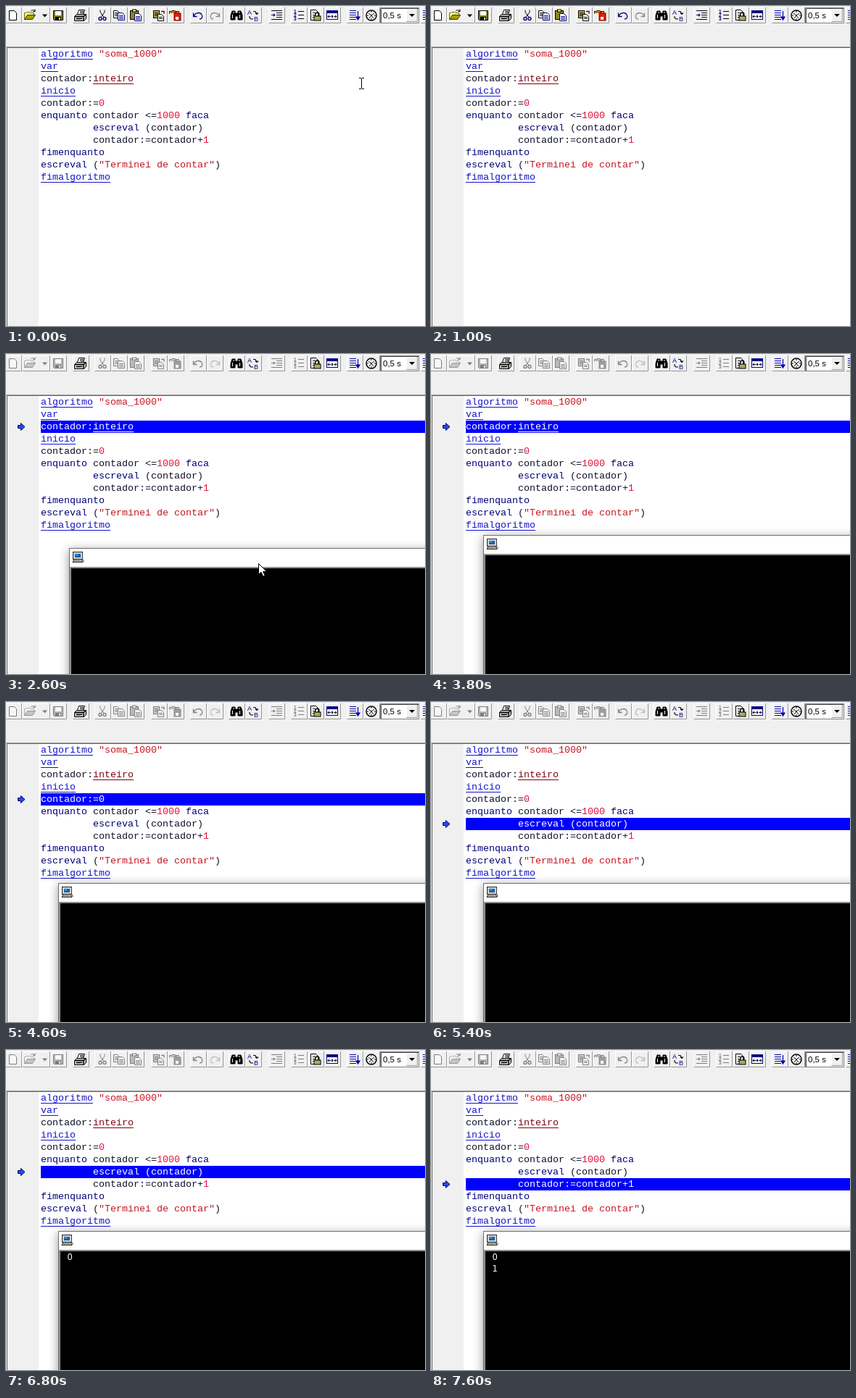
Recreate the animation shown at these times as an HTML page. Size 578 px wide and 442 px high, loop 8 s.

```html
<!DOCTYPE html>
<html lang="pt">
<head>
<meta charset="utf-8">
<title>Passo a passo</title>
<style>
html, body { margin: 0; width: 100%; height: 100%; overflow: hidden; background: #f0f0f0; }
svg { display: block; width: 578px; height: 442px; }
.code { font: 13.33px "Liberation Mono", "Courier New", monospace; white-space: pre; }
.sel text, .sel rect { fill: #fff; }
.off { filter: grayscale(1) opacity(.48); }
.ui { font: 11px "Liberation Sans", Arial, sans-serif; }
.out { font: 11.5px "DejaVu Sans", sans-serif; fill: #fff; }
</style>
</head>
<body>
<svg id="stage" viewBox="0 0 578 442" xmlns="http://www.w3.org/2000/svg"></svg>
<script>
const LOOP = 8000, TICK = 200, ROW = 17, TOP = 58;
const stage = document.getElementById('stage');

const rect = (x, y, w, h, fill, extra = '') =>
  `<rect x="${x}" y="${y}" width="${w}" height="${h}" fill="${fill}" ${extra}/>`;
const path = (d, stroke = '#000', fill = 'none', width = 1) =>
  `<path d="${d}" stroke="${stroke}" fill="${fill}" stroke-width="${width}"/>`;
const circle = (x, y, r, stroke, fill = 'none', width = 1) =>
  `<circle cx="${x}" cy="${y}" r="${r}" stroke="${stroke}" fill="${fill}" stroke-width="${width}"/>`;
const label = (x, y, s, fill, size, weight = 400) =>
  `<text class="ui" x="${x}" y="${y}" fill="${fill}" style="font-size:${size}px;font-weight:${weight}">${s}</text>`;
const page = (x, y, w, h, stroke = '#000') =>
  path(`M${x} ${y}h${w - 3}l3 3v${h - 3}h${-w}z`, stroke, '#fff');
const lines = (x, y, w, n, color = '#000', step = 3) =>
  path(Array.from({ length: n }, (_, i) => `M${x} ${y + i * step}h${w}`).join(''), color);

// Icons are drawn around their own centre.
const folder = path('M-8.5 5.5v-9h2l1-1h4l1 1h5v3', '#6b6b00', '#ffff80') +
  path('M-8.5 5.5l4-6h11l-4 6z', '#333300', '#a8a000') +
  path('M0 -5.5c2 -3 5 -2 6 0m0 -3v3h-3');
const clipboard = rect(-7.5, -6.5, 11, 12, '#8c8420', 'stroke="#000"') +
  rect(-4.5, -8, 5, 3, '#ffff70', 'stroke="#000"') +
  page(-1.5, -2.5, 9, 10, '#000080') + lines(0, 1.5, 6, 3, '#000080', 2);
const icons = {
  blank: page(-5.5, -6.5, 10, 13),
  open: folder,
  save: path('M-6.5 -6.5h13v13h-12l-1-1z', '#000', '#808000') +
    rect(-4, -6, 8, 6, '#fff') + rect(-4, 2, 8, 5, '#000') + rect(1, 3, 2, 3, '#fff'),
  print: path('M-4.5 -1.5l2-6h8l-2 6', '#000', '#fff') +
    path('M-8.5 1.5l3-3h13v6l-3 3h-13z', '#000', '#c0c0c0') +
    path('M-8 1.5h12v6M4 1.5l3-3M-6 4.5h8', '#000', 'none', 1.4) +
    rect(-1, 5, 3, 1.5, '#e0d000') + lines(-1, -5.5, 5, 2, '#000', 2),
  cut: path('M-3 -7.5v3l5 7M3 -7.5v3l-5 7', '#000') +
    circle(-3, 4.5, 2, '#000080', 'none', 1.4) + circle(3, 4.5, 2, '#000080', 'none', 1.4),
  copy: page(-7.5, -6.5, 8, 10) + lines(-6, -3.5, 4, 3, '#000', 2) +
    page(-1.5, -3.5, 9, 10, '#000080') + lines(0, .5, 6, 3, '#000080', 2),
  paste: clipboard,
  stack: rect(-7.5, -6.5, 8, 10, '#c0b030', 'stroke="#000"') + lines(-6, -3.5, 5, 3, '#000', 2) +
    page(-1.5, -1.5, 8, 9) + lines(0, 2.5, 5, 2, '#000', 2) + path('M3 -5.5h4v3', '#800000', 'none', 1.5),
  stamp: path('M-8.5 -2.5v-3h2l1-1h4l1 1h5v4', '#000', '#f0d020') +
    rect(-2, -3, 9, 10, '#e02010', 'stroke="#700"') + rect(0, 2, 4, 4, '#fff') +
    path('M-7 -4.5h8m-2 -2l3 2l-3 2', '#c00000', '#c00000'),
  undo: path('M-6.5 -3.5v5h5M-6 1c2 -5 9 -6 11 -2c2 3 0 6 -3 6', '#000080', 'none', 1.3),
  redo: path('M6.5 -3.5v5h-5M6 1c-2 -5 -9 -6 -11 -2c-2 3 0 6 3 6', '#888', 'none', 1.3),
  find: path('M-6 -6h4v3h4v-3h4l2 6v6h-6v-5h-4v5h-6v-6z', '#000', '#000') +
    path('M-5.5 -1v5M4.5 -1v5M-4 -5v2M4 -5v2', '#fff'),
  swap: label(-8, -1, 'A', '#000080', 9) + label(1, 8, 'B', '#000080', 9) +
    path('M0 -5.5h3l2 3m-2 -1l2 2l2 -2M-5 1v2l2 2h3', '#000', 'none', 1.1),
  indent: lines(-7, -6.5, 15, 2, '#000', 12) + lines(0, -3.5, 8, 3) +
    path('M-7 -.5h5m-2 -2l2 2l-2 2', '#000080', '#000080'),
  list: lines(-1, -5.5, 8, 3, '#000', 5) +
    [0, 1, 2].map(i => label(-7, -3 + 5 * i, i + 1, '#000080', 6.5, 700)).join(''),
  lock: page(-6.5, -7.5, 10, 14) + lines(-4, -3.5, 4, 3) +
    path('M0 1v-2c0 -4 5 -4 5 0v2', '#000', 'none', 1.3) + rect(-2, 1, 9, 6, '#b0a860', 'stroke="#000"'),
  panel: rect(-7.5, -6.5, 15, 12, '#fff', 'stroke="#000080"') + rect(-7, -6, 14, 3, '#000080') +
    path('M-6 1.5h4m-2 -2l-2 2l2 2M6 1.5h-4m2 -2l2 2l-2 2', '#000') + rect(-1, 0, 2, 3, '#000080'),
  run: lines(-7, -6.5, 9, 5, '#0000b0') +
    path('M4.5 -6v11m-2.5 -3l2.5 4l2.5 -4z', '#0000b0', '#0000b0', 1.2),
  clock: circle(0, 0, 7, '#000', '#fff', 1.5) +
    path('M-4 -3l4 3l4 -3M-3 4l3 -4l3 4M0 -6v2M0 4v2M-6 0h2M4 0h2', '#000')
};

// name, left, width, greyed while the program runs
const buttons = [
  ['blank', -1, 23, 1], ['open', 22, 39, 1], ['save', 61, 23, 1], ['print', 92, 23, 0],
  ['cut', 122, 23, 1], ['copy', 145, 23, 1], ['paste', 168, 23, 1],
  ['stack', 200, 23, 1], ['stamp', 223, 23, 1], ['undo', 254, 23, 1], ['redo', 277, 23, 1],
  ['find', 307, 23, 0], ['swap', 330, 23, 0], ['indent', 362, 23, 1], ['list', 393, 23, 1],
  ['lock', 416, 23, 0], ['panel', 439, 23, 0], ['run', 470, 23, 0], ['clock', 493, 23, 0]
];
const bevel = (x, y, w, h) => rect(x, y, w, h, '#f0f0f0') +
  path(`M${x + .5} ${y + h - 1}V${y + .5}H${x + w - 1}`, '#fff') +
  path(`M${x + .5} ${y + h - .5}H${x + w - .5}V${y}`, '#969696');
const button = ([name, x, w, dims]) => {
  const cx = name === 'open' ? x + 12 : x + 11;
  const drop = name === 'open' ? path(`M${x + 28} 11.5h7l-3.5 4z`, 'none', '#000') : '';
  return bevel(x, 2, w, 22) +
    `<g ${dims ? 'data-dims' : ''}><g transform="translate(${cx} 13)">${icons[name]}</g>${drop}</g>`;
};
const combo = rect(516.5, 2.5, 53, 21, '#fff', 'stroke="#808080"') +
  path('M517.5 23V3.5H569', '#505050') + label(520, 17, '0,5 s', '#000', 11.5) +
  bevel(552, 4, 16, 18) + path('M556 11h8l-4 4z', 'none', '#000') +
  bevel(572, 2, 23, 22) + lines(575, 6.5, 6, 5, '#0000b0');

// Tokens: k underlined keyword, w plain keyword, t type, n number, s string, i identifier
const colors = { k: '#1414c8', w: '#000078', t: '#800010', n: '#e0143c', s: '#c81420', i: '#101028' };
const program = [
  [['k', 'algoritmo'], ['s', ' "soma_1000"']],
  [['k', 'var']],
  [['i', 'contador:'], ['t', 'inteiro']],
  [['k', 'inicio']],
  [['i', 'contador:='], ['n', '0']],
  [['w', 'enquanto'], ['i', ' contador <='], ['n', '1000'], ['w', ' faca']],
  [['w', '         escreval'], ['i', ' (contador)']],
  [['i', '         contador:=contador+'], ['n', '1']],
  [['w', 'fimenquanto']],
  [['w', 'escreval'], ['i', ' ('], ['s', '"Terminei de contar"'], ['i', ')']],
  [['k', 'fimalgoritmo']]
];
const codeLine = (tokens, i) => {
  let x = 48;
  const y = TOP + i * ROW;
  const body = tokens.map(([kind, s]) => {
    const at = x, color = colors[kind];
    x += 8 * s.length;
    const lead = s.length - s.trimStart().length;
    return `<text class="code" x="${at + 8 * lead}" y="${y + 12}" fill="${color}">${s.trim().replace('<', '&lt;')}</text>` +
      ('kt'.includes(kind) ? rect(at, y + 15, 8 * s.length, 1, color) : '');
  }).join('');
  return `<g class="line">${body}</g>`;
};

const computer = rect(5.5, 5.5, 13, 10, '#d8d4c8', 'stroke="#202020"') +
  rect(8, 8, 8, 5, '#1060c0') + rect(9, 9, 3, 1, '#60d0ff') +
  path('M7 15.5h10l2 4h-14z', '#202020', '#c8c4b0') + path('M18.5 6v9l2 4', '#404040') +
  lines(7, 17.5, 9, 1, '#707060');

stage.innerHTML = `
  <defs><filter id="shade" x="-10%" y="-15%" width="120%" height="130%">
    <feDropShadow dx="0" dy="3" stdDeviation="7" flood-opacity=".42"/></filter></defs>
  ${rect(0, 0, 578, 442, '#f0f0f0')}
  ${buttons.map(button).join('')}${combo}
  ${rect(45, 58, 533, 384, '#fff')}
  ${rect(0, 56, 578, 1, '#a0a0a0')}${rect(1, 57, 577, 1, '#696969')}${rect(1, 57, 1, 385, '#696969')}
  <g id="mark">${rect(48, 0, 530, ROW, '#0000ff')}
    ${path('M16.5 6.5h4v-3l5.5 5l-5.5 5v-3h-4z', '#000070', '#2050f0')}</g>
  ${program.map(codeLine).join('')}
  <g id="console">
    <g filter="url(#shade)">${rect(0, 0, 640, 330, '#707070')}</g>
    ${rect(1, 1, 638, 25, '#fff')}${rect(1, 26, 638, 303, '#909090')}${rect(3, 28, 634, 300, '#000')}
    ${computer}
    <text class="out" x="12.5" y="40">0</text><text class="out" x="12.5" y="56">1</text>
  </g>
  <g id="beam">${path('M-3.5 -7.5h3m1 0h3M0 -7v14M-3.5 7.5h3m1 0h3', '#000')}</g>
  <g id="arrow">${path('M.5 .5v15l3.5 -3.3l2.6 6l2.6 -1.1l-2.6 -5.8h4.8z', '#000', '#fff')}</g>`;

const byId = id => document.getElementById(id);
const mark = byId('mark'), win = byId('console'), beam = byId('beam'), arrow = byId('arrow');
const codeLines = [...document.querySelectorAll('.line')];
const dimmed = [...document.querySelectorAll('[data-dims]')];
const outputs = [...win.querySelectorAll('.out')];

const steps = [[0, -1], [1600, 0], [2200, 1], [2600, 2], [4000, 3], [4400, 4], [5000, 5],
  [5400, 6], [5800, 7], [6600, 8], [6800, 6], [7200, 7]];
const printedAt = [5800, 7200];
const mouse = [[0, 490, 107], [200, 490, 105], [600, 528, 48], [800, 545, 10], [1000, 548, -30],
  [1800, 400, -30], [2200, 364, 170], [2400, 350, 303], [2600, 348, 289],
  [3200, 333, 271], [3400, 333, 271], [3600, 480, 284], [3800, 590, 260]];

const show = (el, on) => el.setAttribute('display', on ? 'inline' : 'none');
const move = (el, x, y) => el.setAttribute('transform', `translate(${x} ${y})`);

function along(track, t) {
  const next = track.findIndex(p => p[0] > t);
  if (next < 0) return track[track.length - 1].slice(1);
  const a = track[next - 1], b = track[next], k = (t - a[0]) / (b[0] - a[0]);
  return [1, 2].map(i => Math.round(a[i] + (b[i] - a[i]) * k));
}

function render(time) {
  const t = Math.floor((time % LOOP) / TICK) * TICK;
  const row = steps.filter(s => s[0] <= t).pop()[1];
  show(mark, row >= 0);
  move(mark, 0, TOP + row * ROW);
  codeLines.forEach((el, i) => el.classList.toggle('sel', i === row));
  dimmed.forEach(el => el.classList.toggle('off', t >= 1400));

  const drag = Math.min(1, Math.max(0, (t - 2600) / 600));
  show(win, t >= 2600);
  move(win, Math.round(87 - 15 * drag), Math.round(268 - 18 * drag));
  outputs.forEach((el, i) => show(el, t >= printedAt[i]));

  const [x, y] = along(mouse, t);
  const overText = y > 57 && t < 2600;
  show(beam, overText);
  show(arrow, !overText);
  move(beam, x + .5, y);
  move(arrow, x, y);
}

const start = performance.now();
function frame() {
  render(performance.now() - start);
  requestAnimationFrame(frame);
}
frame();
</script>
</body>
</html>
```
